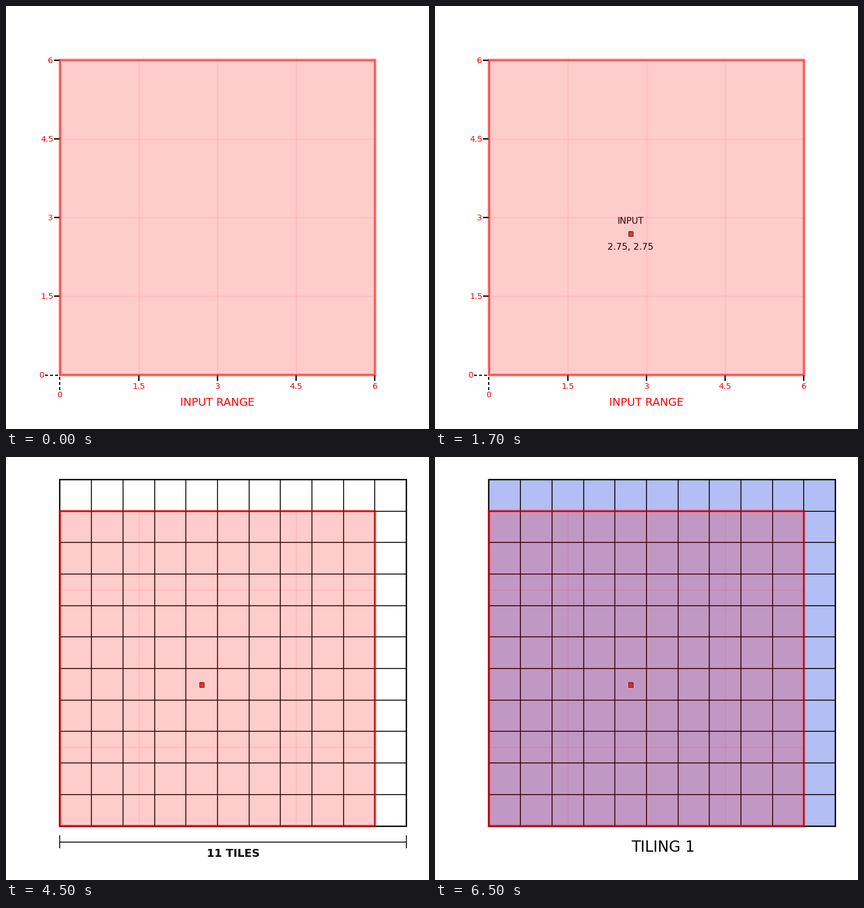
Write a matplotlib script that moves like this. It is 748 px wide and 748 px high and loops after 8 s.

```python
import matplotlib.pyplot as plt
from matplotlib.animation import FuncAnimation
from matplotlib.patches import Rectangle

SIZE, DPI = 748, 100
LEFT, BOTTOM, SPAN = 95.5, 652.5, 557.0
TILE = SPAN / 10
RIGHT, TOP = LEFT + SPAN, BOTTOM - SPAN
FULL_RIGHT, FULL_TOP = RIGHT + TILE, TOP - TILE
STEP_MS, LOOP_MS = 500, 8000
RED = (1, 0, 0)

plt.rcParams["font.family"] = "DejaVu Sans"
fig = plt.figure(figsize=(SIZE / DPI, SIZE / DPI), dpi=DPI, facecolor="white")
ax = fig.add_axes([0, 0, 1, 1])
ax.set(xlim=(0, SIZE), ylim=(SIZE, 0))
ax.axis("off")


def pt(px):
    return px * 72 / DPI


def line(x0, y0, x1, y1, width, color="black", zorder=3, **kw):
    return ax.plot([x0, x1], [y0, y1], color=color, lw=pt(width), zorder=zorder,
                   solid_capstyle="butt", dash_capstyle="butt", **kw)[0]


def text(x, baseline, string, px, color="black", **kw):
    return ax.text(x, baseline, string, fontsize=pt(px), color=color, zorder=3,
                   ha="left", va="baseline", **kw)


def box(x, y, w, h, **kw):
    return ax.add_patch(Rectangle((x, y), w, h, **kw))


def make_input_area():
    box(LEFT, TOP, SPAN, SPAN, fc=RED, ec="none", alpha=0.2, zorder=5)
    for k in (1, 2, 3):
        d = k * SPAN / 4
        line(LEFT + d, TOP, LEFT + d, BOTTOM, 3, RED, 6, alpha=0.06)
        line(LEFT, TOP + d, RIGHT, TOP + d, 3, RED, 6, alpha=0.06)
    box(LEFT, TOP, SPAN, SPAN, fc="none", ec=RED, lw=pt(4.2), alpha=0.6,
        zorder=7, snap=False, joinstyle="miter")


def make_axes():
    parts = [text(308, 707, "INPUT RANGE", 19.44, RED)]
    dashes = (0, (2.5, 2))
    parts += [line(69, BOTTOM, LEFT - 2, BOTTOM, 2, ls=dashes),
              line(LEFT, 679, LEFT, BOTTOM + 2, 2, ls=dashes),
              text(59, 657, "0", 14.4, RED),
              text(91, 692, "0", 14.4, RED)]
    for k, name in enumerate(("1.5", "3", "4.5", "6"), 1):
        x, y = LEFT + k * SPAN / 4, BOTTOM - k * SPAN / 4
        wide = len(name) > 1
        parts += [line(x, BOTTOM, x, 663, 2.4),
                  line(85, y, LEFT, y, 2.4),
                  text(x - (11.5 if wide else 4.6), 677, name, 14.4, RED),
                  text(61 if wide else 74, y + 5, name, 14.4, RED)]
    return parts


def make_marker():
    return [box(342, 398, 8.5, 8.5, fc=(0.925, 0.04, 0.04), ec="none",
                alpha=0.8, zorder=8),
            box(342.5, 398.5, 8, 8, fc="none", ec=(0.36, 0.12, 0.12),
                lw=pt(1), zorder=9)]


def make_marker_text():
    return [text(323, 385, "INPUT", 15.8), text(305, 431, "2.75, 2.75", 16)]


def make_tiles():
    parts = [box(LEFT, FULL_TOP, 11 * TILE, 11 * TILE, fc="none", ec="black",
                 lw=pt(2.4), zorder=4, joinstyle="miter")]
    for k in range(1, 11):
        d = k * TILE
        parts += [line(LEFT + d, FULL_TOP, LEFT + d, BOTTOM, 1.6),
                  line(LEFT, BOTTOM - d, FULL_RIGHT, BOTTOM - d, 1.6)]
    return parts


def make_bracket(end, label_x, label):
    return [line(LEFT, 680.5, end, 680.5, 1.6),
            line(LEFT, 669, LEFT, 692, 1.6),
            line(end, 669, end, 692, 1.6),
            text(label_x, 707, label, 19.44, weight="bold")]


def make_tiling():
    return [box(LEFT, FULL_TOP, 11 * TILE, 11 * TILE, ec="none", zorder=1,
                fc=(178 / 255, 190 / 255, 244 / 255)),
            text(347, 698, "TILING 1", 26.5)]


make_input_area()
# Each group is visible from its start until its end, in ms.
groups = [
    (make_axes(), 0, 2500),
    (make_marker(), 500, LOOP_MS),
    (make_marker_text(), 500, 2500),
    (make_tiles(), 2500, LOOP_MS),
    (make_bracket(RIGHT, 327, "10 TILES"), 2500, 4500),
    (make_bracket(FULL_RIGHT, 355, "11 TILES"), 4500, 6500),
    (make_tiling(), 6500, LOOP_MS),
]


def update(frame):
    now = frame * STEP_MS
    for parts, start, end in groups:
        for part in parts:
            part.set_visible(start <= now < end)
    return []


update(0)
anim = FuncAnimation(fig, update, frames=LOOP_MS // STEP_MS, interval=STEP_MS,
                     repeat=True, repeat_delay=0, blit=False)
plt.show()
```
